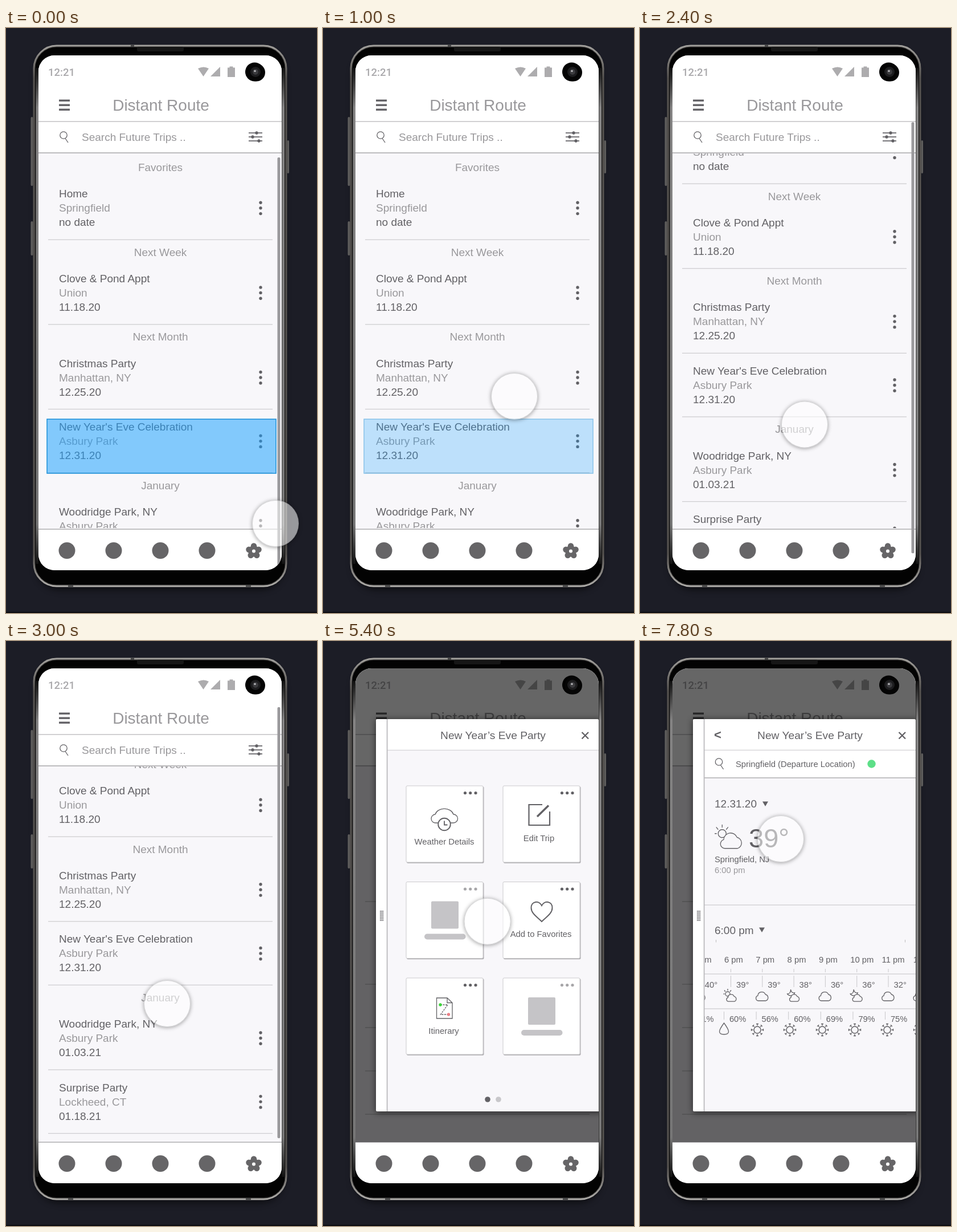
An HTML page that plays this animation: 546 px wide and 1026 px high, repeating every 8000 ms.

```html
<!DOCTYPE html>
<html lang="en">
<head>
<meta charset="utf-8">
<title>Trip planner prototype</title>
<style>
  html, body { margin: 0; width: 100%; height: 100%; overflow: hidden; background: #1c1d26; }
  svg { position: absolute; left: 0; top: 0; font-family: "Liberation Sans", Arial, sans-serif; }
  .line { fill: none; stroke: #626165; stroke-width: 1.3; }
  #cursor {
    position: absolute; left: -41px; top: -41px; width: 82px; height: 82px; border-radius: 50%;
    box-sizing: border-box; background: rgba(255,255,255,.55);
    border: 1.5px solid rgba(120,120,122,.3); box-shadow: 0 1px 7px rgba(0,0,0,.38);
  }
  #cursor.down { background: rgba(236,236,238,.6); border-color: rgba(140,140,142,.6); box-shadow: none; }
</style>
</head>
<body>
<svg id="stage" width="546" height="1026" viewBox="0 0 546 1026"></svg>
<div id="cursor"></div>
<script>
const DARK = '#626165', LIGHT = '#99989b', RULE = '#cfced1', PAPER = '#f8f7fa';

const range = (a, b) => Array.from({ length: b - a + 1 }, (_, i) => a + i);
const each = (list, draw) => list.map(draw).join('');
const text = (x, y, s, size = 19, fill = DARK, anchor = 'start', extra = '') =>
  `<text x="${x}" y="${y}" font-size="${size}" fill="${fill}" text-anchor="${anchor}" ${extra}>${s}</text>`;
const rect = (x, y, w, h, fill, extra = '') =>
  `<rect x="${x}" y="${y}" width="${w}" height="${h}" fill="${fill}" ${extra}/>`;
const disc = (x, y, r, fill = DARK, extra = '') =>
  `<circle cx="${x}" cy="${y}" r="${r}" fill="${fill}" ${extra}/>`;
const path = (d, extra = '') => `<path class="line" d="${d}" ${extra}/>`;
const fill = (d, color) => `<path d="${d}" fill="${color}"/>`;
const at = (x, y, body, k = 1) => `<g transform="translate(${x} ${y}) scale(${k})">${body}</g>`;
const rule = (x1, x2, y, color = RULE, w = 1.3) => rect(x1, y - w / 2, x2 - x1, w, color);

function phoneBody() {
  return rect(52, 40, 437, 946, '#000', 'rx="42" opacity=".5" filter="url(#blur)"')
    + rect(43.5, 156, 4, 121, '#5d5c5b', 'rx="2"')
    + rect(43.5, 339, 4, 60, '#5d5c5b', 'rx="2"')
    + rect(493.5, 197, 3.5, 58, '#5d5c5b', 'rx="2"')
    + rect(49, 31, 443, 948, '#2c2b2b', 'rx="40" stroke="url(#metal)" stroke-width="3"')
    + rect(51.5, 34, 438, 942, '#030303', 'rx="37"')
    + rect(52.5, 70, 4.5, 870, 'url(#side)')
    + rect(484.5, 70, 4.5, 870, 'url(#side)')
    + rect(230, 33, 82, 8, '#161616', 'rx="3"')
    + rect(219, 29.5, 6, 3.5, '#444')
    + rect(109, 977, 9, 3.5, '#4a4a4a') + rect(421, 977, 9, 3.5, '#4a4a4a');
}

const magnifier = (x, y) => path(`M${x + 3} ${y + 5.5}l5 7.5`, 'stroke-width="2"')
  + disc(x, y, 6.2, 'none', `stroke="${DARK}" stroke-width="1.3"`);

function header() {
  return rect(57, 48, 427, 171, '#fff')
    + text(74, 84, '12:21', 18.5, '#a9a8ab', 'start', 'font-family="Roboto, sans-serif" font-weight="500"')
    + fill('M337 71q10-5 19 0L346.500 85ZM359 85h17V68ZM389 69.500h3.500V67.500h6V69.500H402V86H389Z', '#adacae')
    + each([126.500, 134.500, 142.500], y => rect(93, y - 1, 19, 3.4, DARK))
    + text(272, 144.5, 'Distant Route', 28, LIGHT, 'middle')
    + rule(57, 484, 164, '#c6c5c7', 1.6)
    + magnifier(101, 188)
    + text(133, 198, 'Search Future Trips ..', 19, LIGHT)
    + each([[184, 440], [191, 433], [198, 444]], ([y, x]) => rule(426, 450, y, DARK, 1.7) + disc(x, y, 2.7))
    + rule(57, 484, 219, '#bdbcbe', 2);
}

const trips = [
  ['Favorites', 'Home', 'Springfield', 'no date'],
  ['Next Week', 'Clove &amp; Pond Appt', 'Union', '11.18.20'],
  ['Next Month', 'Christmas Party', 'Manhattan, NY', '12.25.20'],
  ['', "New Year's Eve Celebration", 'Asbury Park', '12.31.20'],
  ['January', 'Woodridge Park, NY', 'Asbury Park', '01.03.21'],
  ['', 'Surprise Party', 'Lockheed, CT', '01.18.21'],
];

function tripList() {
  let y = 222.7;
  return each(trips, ([group, name, place, date]) => {
    const top = y + (group ? 74.6 : 37.6);
    const head = group ? text(271, y + 28.4, group, 19, LIGHT, 'middle') : '';
    y = top + 74;
    return head + text(93, top, name) + text(93, top + 25, place, 19, LIGHT) + text(93, top + 50, date)
      + each([9, 18.5, 28.3], d => disc(447, top + d, 2.7)) + rule(74, 468, y);
  });
}

function navBar() {
  const lobes = each(range(0, 4), i => {
    const a = (i * 72 - 90) * Math.PI / 180;
    return disc(9 * Math.cos(a), 9 * Math.sin(a), 5.2, '#666567');
  });
  return rect(57, 879, 427, 72, '#fff') + rule(57, 484, 879, '#c2c1c3', 2)
    + each([107, 189, 271, 353], x => disc(x, 916.5, 14.5, '#666567'))
    + at(435, 917.5, lobes + disc(0, 0, 10, '#666567') + disc(0, 0, 3, '#fff'));
}

const camera = disc(436.5, 77, 16.5, '#000') + disc(439.5, 78, 15.5, '#050505')
  + disc(438, 77, 9, '#1d1d1f') + disc(438, 77, 5, '#3b3b3e') + disc(437, 75.5, 1.8, '#b5b5b8');

const label = (x, y, s) => text(x, y, s, 14.8, DARK, 'middle');
const placeholder = (x, y) => rect(x + 44, y + 34, 48, 48, '#c5c4c7', 'rx="2"')
  + rect(x + 32, y + 91, 72.5, 10, '#c5c4c7', 'rx="5"');

function card(x, y, active) {
  return rect(x + 1, y + 1.2, 135.5, 134.5, '#aeadb0', 'rx="2"')
    + rect(x, y, 135, 134, '#fff', 'rx="2" stroke="#cbcacd"')
    + each([103.5, 112.7, 122], d => disc(x + d, y + 12.5, 2.6, active ? DARK : '#a7a6a9'))
    + (active ? '' : placeholder(x, y));
}

function menuPage() {
  return card(146, 254, 1) + card(316, 254, 1) + card(146, 422.5) + card(316, 422.5, 1)
    + card(146, 591, 1) + card(316, 591)
    + path('M202 319h-4a7.500 7.500 0 0 1-1-15a16.500 13 0 0 1 32 0a7.500 7.500 0 0 1 0 15h-5')
    + disc(213, 321.5, 10.8, '#fff', `stroke="${DARK}" stroke-width="1.9"`)
    + path('M213 315.500v7h5.500', 'style="stroke-width:1.8"')
    + label(213, 357, 'Weather Details')
    + path('M385 287H361.500V323H398V299', 'style="stroke-width:2.2"')
    + path('M376 308L396 288.500', 'style="stroke-width:3.4"')
    + label(379, 351, 'Edit Trip')
    + path('M384 492C376 484 365.500 478 365.500 468C365.500 456 379 454.500 384 464C389 454.500 402.500 456 402.500 468C402.500 478 392 484 384 492Z', 'style="stroke-width:2"')
    + label(382.5, 518.5, 'Add to Favorites')
    + path('M199.500 626H218L227 634.500V662H199.500ZM218 626V634.500H227')
    + path('M206 638H219L206.500 655H220', 'stroke-dasharray="3 1.5"')
    + disc(206, 638, 2.7, '#3fd53c') + disc(220.5, 655, 2.7, '#ee7f86')
    + label(212, 688.5, 'Itinerary')
    + disc(289, 804, 4.8) + disc(308, 804, 4.8, '#c8c7ca');
}

const cloud = path('M-6.500 9a4.500 4.500 0 0 1-1-8.800A7 7 0 0 1 6-2A5.700 5.700 0 0 1 6.500 9Z', `vector-effect="non-scaling-stroke" style="fill:${PAPER}"`);
const sun = path('M-9-3a4 4 0 1 0 8 0a4 4 0 1 0-8 0M-5-9v-3M-9-7l-2-2.500M-1-7l2-2.500M-10.500-3h-2', 'vector-effect="non-scaling-stroke"');
const moon = path('M-5-11q1 7 7 6q-2 6-8 5q-4-1-5-3q6 0 6-8Z');
const snow = disc(0, 0, 6, 'none', `stroke="${DARK}" stroke-width="1.5"`)
  + each(range(0, 7), i => `<path class="line" d="M0-7.500v-3M-2-10.500h4" transform="rotate(${i * 45})"/>`);
const sunny = sun + at(1.5, 3, cloud, .8), night = moon + at(1.5, 3, cloud, .8);
const caret = (x, y) => fill(`M${x} ${y}h10l-5 8.500Z`, DARK);

function weatherPage() {
  const skies = [cloud, sunny, cloud, night, cloud, night, cloud, cloud];
  const temps = [40, 39, 39, 38, 36, 36, 32];
  const rain = [81, 60, 56, 60, 69, 79, 75];
  const hourX = i => 55.3 * (i - 1), rainX = i => 56.6 * (i - 1);
  return text(130, 172, '&lt;', 22, DARK, 'start', 'font-weight="bold"')
    + rect(113, 192, 371, 48, '#fff') + rule(113, 484, 191.5, '#d6d5d8') + rule(113, 484, 240, '#bdbcbe', 1.8)
    + magnifier(138.5, 212) + text(168, 221, 'Springfield (Departure Location)', 14.8)
    + disc(406.5, 215.5, 7.2, '#5ddf88')
    + text(131, 292, '12.31.20') + caret(215, 281.5)
    + at(153, 343, sun, 1.75) + at(160, 348, cloud, 1.75)
    + text(191, 362, '39°', 47)
    + text(131, 388, 'Springfield, NJ', 14.8) + text(131, 407, '6:00 pm', 14.8, LIGHT)
    + rule(113, 484, 463) + text(131, 513.5, '6:00 pm') + caret(209, 502.5)
    + each([133.5, 465.5], x => rect(x - .5, 524, 1, 4.5, '#bbb'))
    + rule(113, 484, 584) + rule(113, 484, 645)
    + each(range(0, 7), i => text(148 + hourX(i), 563.5, `${i + 5} pm`, 14.8)
      + rect(159 + hourX(i), 575, 1, 6, '#c8c7ca') + rect(159 + hourX(i), 587, 1, 20, '#c8c7ca')
      + at(159 + hourX(i), 622, skies[i]))
    + each(temps, (v, i) => text(169 + hourX(i), 608, v + '°', 14.8))
    + each(rain, (v, i) => text(157 + rainX(i), 668, v + '%', 14.6) + rect(147 + rainX(i), 650, 1, 14, '#c8c7ca'))
    + path('M147.500 670q8 11 8 15q0 5-8 5t-8-5q0-4 8-15Z')
    + each(range(0, 5), i => at(206 + 57 * i, 682, snow));
}

function modal() {
  const grip = each(range(0, 6), r => each(range(0, 2), c => rect(100 + c * 2.3, 473 + r * 2.7, 1.5, 1.7, DARK)));
  return rect(93, 138, 400, 689, '#000', 'opacity=".6" filter="url(#blur)"')
    + rect(93, 137, 391, 688, '#fff', 'rx="2"')
    + rect(113, 192, 371, 633, PAPER) + rule(113, 484, 191.5, '#d6d5d8')
    + `<g clip-path="url(#pane)"><g id="menu">${menuPage()}</g><g id="weather">${weatherPage()}</g></g>`
    + rect(111.7, 137, 1.8, 688, '#bbbabd') + grip
    + text(298.5, 171.5, 'New Year’s Eve Party', 19.2, DARK, 'middle')
    + path('M454.500 160l11.500 11.500M466 160l-11.500 11.500', 'style="stroke-width:2.3"');
}

const shade = rect(57, 220, 427, 659, PAPER)
  + each([457, 602, 678, 754, 830], y => rule(74, 468, y, '#c4c3c6'))
  + rect(57, 48, 427, 831, '#000', 'opacity=".6"');

document.getElementById('stage').innerHTML = `
  <defs>
    <filter id="blur" x="-20%" y="-20%" width="140%" height="140%"><feGaussianBlur stdDeviation="6"/></filter>
    <linearGradient id="metal" x2="0" y2="1">
      <stop stop-color="#a19f9b"/><stop offset=".06" stop-color="#55524f"/>
      <stop offset=".94" stop-color="#55524f"/><stop offset="1" stop-color="#b0aeaa"/>
    </linearGradient>
    <linearGradient id="side" x2="0" y2="1">
      <stop stop-color="#111"/><stop offset=".08" stop-color="#858484"/>
      <stop offset=".92" stop-color="#777"/><stop offset="1" stop-color="#111"/>
    </linearGradient>
    <clipPath id="screen">${rect(57, 48, 427, 903, '#000', 'rx="28"')}</clipPath>
    <clipPath id="view">${rect(57, 219, 427, 658, '#000')}</clipPath>
    <clipPath id="pane">${rect(113, 137, 371, 688, '#000')}</clipPath>
  </defs>
  ${rect(0, 1024, 546, 2, '#0b0b10')}
  <g id="phone">${phoneBody()}
    <g clip-path="url(#screen)">
      ${rect(57, 48, 427, 903, PAPER)}
      <g clip-path="url(#view)"><g id="list">${tripList()}</g></g>
      ${header()}
      ${rect(72, 686, 402, 95, 'rgba(23,160,255,.52)', 'id="hint" stroke="#1a8fd8" stroke-width="1.5"')}
      ${navBar()}
      ${rect(476.5, 227, 5, 756, '#9a999c', 'id="bar" rx="2"')}
      <g id="shade">${shade}</g>
      <g id="modal">${modal()}</g>
      ${rect(57, 880, 427, 0, '#fff')}
    </g>
    ${camera}
  </g>`;

const el = Object.fromEntries(['phone', 'list', 'hint', 'bar', 'shade', 'modal', 'menu', 'weather', 'cursor']
  .map(id => [id, document.getElementById(id)]));
const LOOP = 8000, STEP = 200;
const trail = [[0, 473, 869], [1000, 336, 646], [1200, 293, 735], [2000, 293, 735], [3000, 283, 636],
  [3400, 299, 528], [5200, 299, 528], [6200, 247, 347]];
const bounce = [[1800, 0], [2000, 5.5], [2200, 2], [2400, 0]];

const part = (t, a, b) => Math.min(1, Math.max(0, (t - a) / (b - a)));
const easeOut = p => 1 - (1 - p) ** 2;
const within = (t, a, b) => t >= a && t < b;

// Linear interpolation over rows of [time, ...values].
function follow(keys, t) {
  let i = 0;
  while (i < keys.length - 2 && t >= keys[i + 1][0]) i++;
  const [a, b] = [keys[i], keys[i + 1]], p = part(t, a[0], b[0]);
  return a.slice(1).map((v, k) => v + (b[k + 1] - v) * p);
}

const shift = (node, x, y) => node.setAttribute('transform', `translate(${x} ${y})`);
const fade = (node, v) => node.setAttribute('opacity', v);

function draw(t) {
  const [x, y] = follow(trail, t);
  const scroll = easeOut(part(t, 2100, 3000));
  const open = easeOut(part(t, 3200, 3800));
  el.cursor.style.transform = `translate(${x}px, ${y}px)`;
  el.cursor.className = within(t, 1400, 1600) || within(t, 6600, 7800) ? 'down' : '';
  shift(el.phone, 0, follow(bounce, t)[0]);
  shift(el.list, 0, -176.7 * scroll);
  shift(el.bar, 0, -111 * scroll);
  shift(el.modal, 410 * (1 - open), 0);
  fade(el.hint, 1 - part(t, 800, 1200));
  fade(el.bar, t < 1000 ? 1 - part(t, 400, 1000) : +within(t, 2000, 3400));
  fade(el.shade, open);
  fade(el.modal, +(open > 0));
  fade(el.menu, +(t < 7000));
  fade(el.weather, +(t >= 7000));
}

const start = performance.now();
function tick() {
  draw(Math.floor((performance.now() - start) % LOOP / STEP) * STEP);
  requestAnimationFrame(tick);
}
tick();
</script>
</body>
</html>
```
